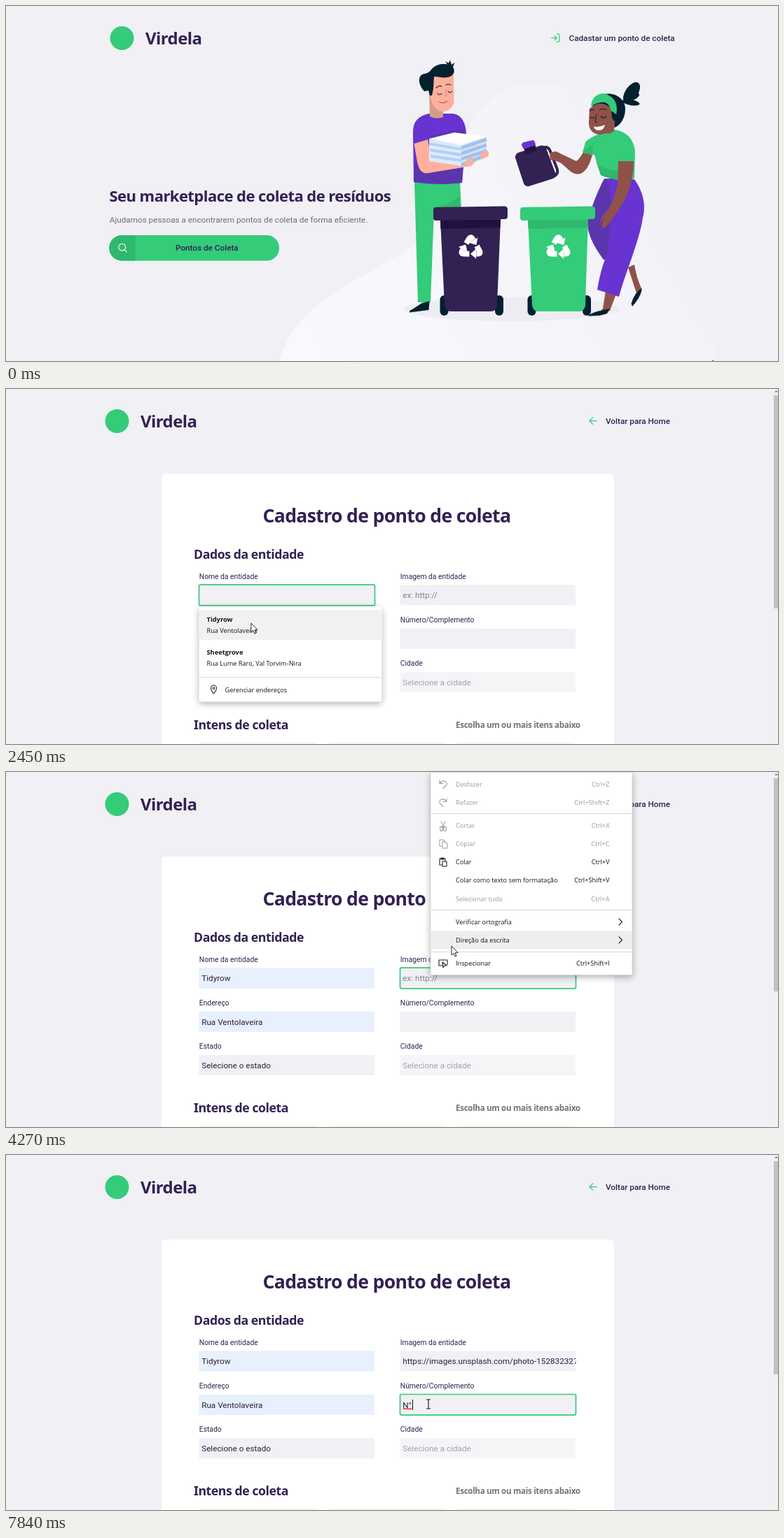
Recreate the animation shown at these times as an HTML page. Size 1102x508 px, loop 8 s.

```html
<!DOCTYPE html>
<html lang="pt-BR">
<head>
<meta charset="utf-8">
<title>Pontos de coleta</title>
<style>
html, body { margin: 0; width: 100%; height: 100%; overflow: hidden; background: #f0f0f5; }
svg { display: block; width: 1102px; height: 508px; cursor: default; }
text { font: 11.73px Roboto, sans-serif; fill: #2a2138; white-space: pre; }
.title { font-family: "Noto Sans", sans-serif; font-weight: 700; letter-spacing: -.025em; fill: #322153; }
.brand { font-size: 24px; }
.h1 { font-size: 26.6px; }
.h2 { font-size: 22px; }
.h3 { font-size: 17.7px; }
.hint { font-size: 11.55px; fill: #75727c; }
.link { font-weight: 500; fill: #322153; }
.label { font-size: 10.3px; fill: #322153; }
.soft { fill: #6c6c80; }
.place { fill: #85838a; }
.off { fill: #a3a1a8; }
.ui { font: 9.2px "Open Sans", sans-serif; fill: #151515; }
.bold { font-weight: 700; font-size: 9.3px; }
.dim { fill: #9a9a9a; }
.line { fill: none; stroke-width: 1.1; stroke-linecap: round; stroke-linejoin: round; }
.shade { filter: drop-shadow(0 3px 5px rgba(0, 0, 0, .3)); }
.skin { fill: #ffb09c; } .brown { fill: #8f524b; } .navy { fill: #03202f; }
.green { fill: #34cb79; } .leaf { fill: #2fb86e; } .violet { fill: #6833d0; }
.plum { fill: #5b35ae; } .dark { fill: #322153; }
</style>
</head>
<body>
<svg viewBox="0 0 1102 508">
  <defs>
    <linearGradient id="haze" x1="0" y1=".7" x2="1" y2=".35">
      <stop offset="0" stop-color="#f8f9fd"/><stop offset=".55" stop-color="#f5f5f9"/><stop offset="1" stop-color="#f0f0f5"/>
    </linearGradient>
    <clipPath id="urlClip"><path d="M563 281H813.500V310H563Z"/></clipPath>
    <g id="third">
      <path d="M-5.800-5.500L-2.200-11.500Q0-15 2.200-11.500L3-10" fill="none" stroke="#fff" stroke-width="7"/>
      <path d="M8.800-13L-2.800-6.600 7-3.500Z" fill="#fff"/>
    </g>
    <g id="cycle">
      <use href="#third"/><use href="#third" transform="rotate(120)"/><use href="#third" transform="rotate(240)"/>
    </g>
  </defs>
  <rect width="1102" height="508" fill="#f0f0f5"/>

  <g id="home">
    <path fill="url(#haze)" d="M391 508C400 470 425 440 470 410C520 377 575 355 605 318C640 270 640 190 680 145C705 117 740 107 775 112C830 119 870 141 905 168C965 214 1015 240 1027 320C1032 380 1025 450 1010 508Z"/>
    <circle cx="165.500" cy="46" r="17" class="green"/>
    <text class="title brand" x="199" y="55">Virdela</text>
    <path class="line" stroke="#34cb79" style="stroke-width:2" transform="translate(777 38.400) scale(.61)" d="M15 3h4a2 2 0 0 1 2 2v14a2 2 0 0 1-2 2h-4M10 17l5-5-5-5M15 12H3"/>
    <text class="link" x="803.500" y="49.700">Cadastar um ponto de coleta</text>
    <text class="title h2" x="147.500" y="279.500">Seu marketplace de coleta de resíduos</text>
    <text class="soft" x="147.800" y="310">Ajudamos pessoas a encontrarem pontos de coleta de forma eficiente.</text>
    <rect x="147.500" y="328" width="242.500" height="36.500" rx="18" class="green"/>
    <path class="leaf" d="M184.500 328V364.500H165.500A18 18 0 0 1 165.500 328Z"/>
    <g class="line" stroke="#fff"><circle cx="165.700" cy="345.200" r="4.900"/><path d="M169.300 348.800L172.300 351.800"/></g>
    <text class="link" x="242" y="350">Pontos de Coleta</text>

    <ellipse cx="722" cy="434" rx="154" ry="17" fill="#ececf2"/>

    <!-- man -->
    <path class="green" d="M583 250H648L650 292H611L606 424H588Z"/>
    <path class="leaf" d="M612 287Q635 285 647 272L648 290H612Z"/>
    <path class="navy" d="M594 425L604.500 422.500 603.500 435 576 438.500Q575 436 580 434Z"/>
    <path class="violet" d="M604 154C590 157 581 164 581 180L582 252Q616 257 651 253L657 186C657 170 652 156 638 154Z"/>
    <path class="plum" d="M583 230L605 185 655 176 651 253Q616 257 582 252Z"/>
    <path class="violet" d="M581 180Q583 165 600 160L610 185 602 191 582 198Z"/>
    <path d="M604 124H624V159Q614 163 605 158Z" fill="#d59b88"/>
    <path class="skin" d="M605 100L639 96L639.500 135C639 147 630 151 622 151C612 149 607 139 605 128Z"/>
    <path class="navy" d="M605 128L603 121 597 122C588 112 587 99 597 97Q604 96 607 91C613 84 621 82 630 83.500L627 79.500 632 81.500 634 77.500 636 84 640.500 81 638 87Q642 94 637 99C628 106 617 100 611 101L610 118 608 128Z"/>
    <g class="line" stroke="#222036"><path d="M616 125q3 4 6 0M631 122q3 4 5.500 0M614 117q4-4 8-2M628 113q4-2 7 0"/><path d="M627 120l2 8-3 .5" stroke="#db8677"/><path d="M618 137q6 4 12-1" stroke="#bc5d58"/></g>
    <path class="skin" d="M582.500 197L602 191 607 219 660 220Q684 209 687 206L689.500 211Q688 218 672 221L664 229 603 239C593 241 589 233 587 223Z"/>
    <path d="M604 190L650 198V229L604 222Z" fill="#dcebfd"/>
    <path d="M650 198L686 187V209L650 228Z" fill="#d4e3f8"/>
    <path d="M604 197L650 205M605 206L650 213M606 215L650 221" fill="none" stroke="#b6cdf5" stroke-width="3.800"/>
    <path d="M650 203L686 191M650 211L686 199M650 219L686 207M650 227L684 214" fill="none" stroke="#a4c1e9" stroke-width="5"/>
    <path d="M603.500 190L640 181 686 187 650 199Z" fill="#fff"/>
    <path class="skin" d="M655 224Q662 214 667 217L664 224Q660 230 655 228ZM676 213L686 206Q691 211 687 216L680 218Z"/>

    <!-- woman -->
    <g class="navy">
      <ellipse cx="893" cy="124" rx="17" ry="9" transform="rotate(-56 893 124)"/>
      <ellipse cx="893" cy="131" rx="12" ry="4.500" transform="rotate(-24 893 131)"/>
      <ellipse cx="892" cy="138" rx="12.500" ry="4" transform="rotate(10 892 138)"/>
      <path d="M845 130C862 119 884 130 884 147C884 162 876 171 869 174L858 155 836 142Z"/>
    </g>
    <path class="brown" d="M888 374L897 370Q900 389 907 404L900 411ZM856 407L871 412 862 436 848 441Q847 437 852 433Z"/>
    <path class="navy" d="M831 443Q837 439 844 437L862 433 858 440Q848 444 831 443.500ZM907.500 403.500Q908 414 894 430L892.500 426Q897 410 907.500 403.500Z"/>
    <path class="plum" d="M854 247H875L865 362 853 363Q828 330 830 306Q843 267 854 247Z"/>
    <path class="violet" d="M857 247L897 248C909 265 914 284 909 303C904 337 884 382 875 416L844 406Q850 370 860 352C857 328 873 290 857 247Z"/>
    <path class="brown" d="M827 203L837 213Q832 233 822 239Q815 243 806 237L787 220 777 219 776 210 785 208 814 222Q821 217 827 203Z"/>
    <path class="green" d="M827 195Q833 187 859 179L869 177Q894 181 898 207L897 247Q874 253 849 242L840 213 823 210Z"/>
    <path class="leaf" d="M841 218Q846 235 878 236V249Q858 247 849 242ZM823 208L838 198 837 214Z"/>
    <path class="brown" d="M855 164H869L868 179Q858 186 853 180Z"/>
    <path class="brown" d="M833 147Q848 132 865 147L867 165Q863 184 846 184Q831 181 832 165Z"/>
    <path class="green" d="M835 144Q836 126 854 125Q876 132 871 156L864 151Q861 136 849 138Q841 139 835 144Z"/>
    <path class="navy" d="M864 150L871 155 868 164 865 160Z"/>
    <path d="M839 172.500Q847 174 855 170Q853 179 845 178Q840 177 839 172.500Z" fill="#fff"/>
    <path class="line" stroke="#261e2b" d="M834 159q3 3 6 0M849 158q4 4 8 0M833 150q3-3 7-1M847 149q5-4 10 0M843 155l-2 11 3 .5"/>
    <path class="brown" d="M874 222H896Q896 244 889 264Q882 283 867 302Q860 314 852 319L850 313 856 300 848 311Q849 300 859 292Q870 273 873 254Z"/>

    <!-- jerrycan -->
    <path d="M773 205L787 238" stroke="#fff" stroke-width="8"/>
    <path d="M733.500 216L765 206 778 241 745 251.500Z" fill="#322153" stroke="#322153" stroke-width="13" stroke-linejoin="round"/>
    <path d="M766 203Q774 200 777 208L787 234Q789 241 780 245" fill="none" stroke="#322153" stroke-width="4"/>
    <path d="M739 203L755 198 758 207 742 212Z" fill="#24143f"/>
    <path class="violet" d="M736 199Q736 196 739 195L752 192Q755 192 756 199L739 205Z"/>
    <path class="brown" d="M776 211Q780 207 789 210L797 217 793 225 786 222 777 220Z"/>

    <!-- bins -->
    <g class="navy">
      <rect x="619.500" y="414" width="12" height="29" rx="6"/><rect x="698" y="414" width="12" height="29" rx="6"/>
      <rect x="744.500" y="414" width="12" height="29" rx="6"/><rect x="823" y="414" width="12" height="29" rx="6"/>
    </g>
    <path class="dark" d="M620 305H706L701 428Q700 437 692 437H636Q627 437 626 428Z"/>
    <path d="M620 306H706L705.500 317 620.500 319Z" fill="#20103d"/>
    <path class="dark" d="M614 288L712 286.500Q716 287 716 291V301Q716 305 712 305L614 307Q610 307 610 303V292Q610 288 614 288Z"/>
    <path class="green" d="M745 305H831L827 428Q826 437 818 437H760Q752 437 751 428Z"/>
    <path class="leaf" d="M745 306H831L830.500 317 745.500 319Z"/>
    <path class="green" d="M738 288L837 286.500Q841 287 841 291V301Q841 305 837 305L738 307Q734 307 734 303V292Q734 288 738 288Z"/>
    <use href="#cycle" transform="translate(663.500 346) scale(1.120)"/>
    <use href="#cycle" transform="translate(788.500 346) scale(1.120)"/>
  </g>

  <g id="form"></g>
  <g id="cursor">
    <path id="arrow" d="M0 0V13L3 10.400 5 15.200 7 14.300 5 9.700H9.200Z" fill="#fff" stroke="#111" stroke-width=".9"/>
    <path id="hand" d="M-1.500 11V1.500Q-1.500 0 0 0T1.500 1.500V6Q4 5 4.500 7Q7 6 7.200 8Q9.500 7.500 9.500 10V13Q9.500 16 8 17.500V19H0V17.500L-4.500 12Q-5.500 10-4 9.500Q-3 9.500-1.500 11ZM1.500 6V10M4.500 7V10M7.200 8V10.500" fill="#fff" stroke="#111" stroke-width=".9" stroke-linejoin="round"/>
    <path id="beam" d="M-3-6.500H-.8Q0-6.500 0-5.700 0-6.500.8-6.500H3M0-5.700V5.700M-3 6.500H-.8Q0 6.500 0 5.700 0 6.500.8 6.500H3" fill="none" stroke="#111" stroke-width="1.100"/>
  </g>
</svg>
<script>
const LOOP = 8000;
const $ = id => document.getElementById(id);
const text = (x, y, s, cls = '') => `<text x="${x}" y="${y}" class="${cls}">${s}</text>`;
const box = (x, y, w, h, fill, more = '') => `<rect x="${x}" y="${y}" width="${w}" height="${h}" fill="${fill}" ${more}/>`;
const group = (id, body, more = '') => `<g id="${id}" ${more}>${body}</g>`;
const COLS = [275.5, 562.5], ROWS = [280.5, 342.8, 405];
const field = (c, r, fill = '#f0f0f5') => box(COLS[c], ROWS[r], 250.5, 29, fill);
const value = (c, r, s, cls) => text(COLS[c] + 3.7, ROWS[r] + 18.9, s, cls);
const focus = (id, c, r) => group(id, box(COLS[c], ROWS[r] - .3, 251, 29.6, 'none', 'stroke="#34cb79" stroke-width="1.7" rx="2"'));
const squiggle = (id, x, y, w) => group(id, `<path class="line" stroke="#e2322d" d="M${x} ${y}${'l1.5 1.500 1.500-1.500'.repeat(Math.round(w / 3))}"/>`);

const entity = 'Tidyrow', street = 'Rua Ventolaveira';
const entity2 = 'Sheetgrove', street2 = 'Rua Lume Raro, Val Torvim-Nira';

function popup(id, x, y, lines) {
  const offsets = [22, 38, 69, 85];
  return group(id, box(x, y, 261, 136.5, '#fff', 'rx="3" class="shade"')
    + (id === 'namePop' ? group('popHover', box(x, y + 5, 261, 43, '#f1f1f1')) : '')
    + lines.map((s, i) => text(x + 11, y + offsets[i], s, i % 2 ? 'ui' : 'ui bold')).join('')
    + `<path d="M${x} ${y + 101.5}h261" stroke="#dcdcdc"/>`
    + `<g class="line" stroke="#222"><path d="M${x + 21} ${y + 125}q-4-5-4-8a4 4 0 0 1 8 0q0 3-4 8Z"/><circle cx="${x + 21}" cy="${y + 117}" r="1.300"/></g>`
    + text(x + 37, y + 122.7, 'Gerenciar endereços', 'ui'));
}

const MENU = [
  [17.5, 'Desfazer', 'Ctrl+Z', 0, 'M0 0v5h5M0 5q4-5 8-3t1 6l-4 4'],
  [43.5, 'Refazer', 'Ctrl+Shift+Z', 0, 'M10 0v5h-5M10 5q-4-5-8-3t-1 6l4 4'],
  [77, 'Cortar', 'Ctrl+X', 0, 'M2 0l5 9M8 0l-5 9M1 10a2 2 0 1 0 3 0a2 2 0 1 0-3 0M6 10a2 2 0 1 0 3 0a2 2 0 1 0-3 0'],
  [103, 'Copiar', 'Ctrl+C', 0, 'M3 9h-3v-9h5l2 2M4 3h4l3 3v6h-7z'],
  [129, 'Colar', 'Ctrl+V', 1, 'M3 10h-3v-9h8v3M2 0h4v2h-4zM4 5h6v7h-6z'],
  [155, 'Colar como texto sem formatação', 'Ctrl+Shift+V', 1],
  [181.5, 'Selecionar tudo', 'Ctrl+A', 0],
  [214.5, 'Verificar ortografia', '', 1],
  [240.5, 'Direção da escrita', '', 1],
  [274, 'Inspecionar', 'Ctrl+Shift+I', 1, 'M4 9h-5v-8h12v7M4 4l6 5h-3l-2 3z']
];

function menu() {
  const rows = MENU.map(([y, name, keys, on, icon]) => {
    const cls = on ? 'ui' : 'ui dim';
    return text(642, y + 3.3, name, cls)
      + `<text x="861.500" y="${y + 3.3}" class="${cls}" text-anchor="end">${keys}</text>`
      + (keys ? '' : `<path class="line" stroke="#222" d="M875 ${y - 4.5}l4.500 4.500-4.500 4.500"/>`)
      + (icon ? `<path class="line" stroke="${on ? '#222' : '#a0a0a0'}" transform="translate(619 ${y - 6})" d="${icon}"/>` : '');
  }).join('');
  return group('menu', box(606, .5, 288, 290, '#fff', 'class="shade" stroke="#cfcfcf" stroke-width=".7"')
    + box(606, 0, 288, 26, '#eee', 'id="menuHover"')
    + '<path d="M606 59.500h288M606 197.500h288M606 257.500h288" stroke="#d8d8d8"/>' + rows);
}

const labels = [['Nome da entidade', 'Imagem da entidade'], ['Endereço', 'Número/Complemento'], ['Estado', 'Cidade']];
$('form').innerHTML =
  '<circle cx="158.500" cy="46" r="17" class="green"/>' + text(192, 55, 'Virdela', 'title brand')
  + '<path class="line" stroke="#34cb79" style="stroke-width:2" transform="translate(830.500 38.200) scale(.61)" d="M21 12H4M12 20L4 12 12 4"/>'
  + text(856, 49.7, 'Voltar para Home', 'link')
  + box(222, 121, 646, 400, '#fff', 'rx="6"')
  + text(366.5, 191.3, 'Cadastro de ponto de coleta', 'title h1')
  + text(268, 243, 'Dados da entidade', 'title h3')
  + labels.map((pair, r) => pair.map((s, c) =>
      text(COLS[c] + .3, ROWS[r] - 8.7, s, 'label') + field(c, r, c && r === 2 ? '#f5f5f8' : undefined)).join('')).join('')
  + value(0, 2, 'Selecione o estado') + value(1, 2, 'Selecione a cidade', 'off')
  + text(268, 486.7, 'Intens de coleta', 'title h3')
  + text(642, 484.5, 'Escolha um ou mais itens abaixo', 'title hint')
  + [275.5, 459, 642.5].map(x => box(x, 505.5, 170.5, 20, '#f5f5f5', 'rx="5"')).join('')
  + box(1096, 0, 6, 508, '#f1f1f1') + box(1096, 9, 6, 305, '#c1c1c1')
  + '<path d="M1097 4.500l2.500-2.500 2.500 2.500z" fill="#777"/>'
  + group('filled', field(0, 0, '#e8f0fe') + field(0, 1, '#e8f0fe') + value(0, 0, entity) + value(0, 1, street))
  + squiggle('nameWave', 279.5, 300.5, 40.5)
  + group('sample', value(1, 0, 'ex: http://', 'place'))
  + group('url', value(1, 0, 'https://images.unsplash.com/photo-1528323273322'), 'clip-path="url(#urlClip)"')
  + focus('nameFocus', 0, 0) + focus('urlFocus', 1, 0) + focus('numFocus', 1, 1)
  + group('n1', value(1, 1, 'N')) + group('n2', value(1, 1, 'N°')) + squiggle('numWave', 567, 362.5, 12)
  + box(0, 350, 1, 15, '#111', 'id="caret"')
  + popup('namePop', 275.5, 311, [entity, street, entity2, street2])
  + popup('numPop', 562.5, 372, [street, entity, street2, entity2])
  + group('tip', box(609.5, 366.5, 107, 20, '#fff', 'stroke="#777"') + text(615.5, 380, 'Preencha este campo.', 'ui soft'))
  + menu();

// [start, end) in ms during which each part is shown
const SHOWN = {
  home: [0, 900], form: [900, LOOP],
  nameFocus: [1910, 3720], namePop: [1910, 2600], popHover: [2250, 2600],
  filled: [2600, LOOP], nameWave: [2600, 3720],
  urlFocus: [3720, 5600], menu: [3800, 4750], sample: [0, 4750], url: [4750, LOOP],
  numFocus: [5600, LOOP], numPop: [5600, 7000], tip: [5830, 6050],
  n1: [7000, 7840], n2: [7840, LOOP], numWave: [7840, LOOP]
};
const CARET = [[5600, 6140, 567], [6680, 7000, 567], [7000, 7530, 575], [7840, LOOP, 580]];
const PATH = [
  [0, 1009, 507], [70, 1009, 507], [580, 828, 49], [900, 828, 49], [1520, 346, 261],
  [1760, 344, 300], [2100, 344, 300], [2450, 350, 335], [2650, 350, 335], [3250, 609, 308],
  [3400, 609, 308], [3570, 609, 291], [3870, 609, 291], [4250, 636, 249], [4290, 636, 249],
  [4490, 666, 127], [4580, 666, 128], [4780, 666, 128], [5500, 603, 355], [6050, 603, 355],
  [6060, 603, 356.5], [LOOP, 603, 356.5]
];

const show = (id, on) => { $(id).style.display = on ? '' : 'none'; };
const during = (t, [a, b]) => t >= a && t < b;

function pointer(t) {
  const i = PATH.findIndex(p => p[0] > t);
  const [t0, x0, y0] = PATH[i - 1], [t1, x1, y1] = PATH[i];
  const u = (t - t0) / (t1 - t0), k = u * u * (3 - 2 * u);
  return [x0 + (x1 - x0) * k, y0 + (y1 - y0) * k];
}

function shape(t, x, y) {
  if (t < 900) return y > 36 && y < 56 && x > 778 && x < 956 ? 'hand' : 'arrow';
  if (during(t, SHOWN.menu)) return 'arrow';
  if (during(t, SHOWN.namePop) && y > 311) return 'arrow';
  const over = COLS.some(c => x > c && x < c + 251) && ROWS.slice(0, 2).some(r => y > r && y < r + 30);
  return over ? 'beam' : 'arrow';
}

function draw() {
  const t = performance.now() % LOOP;
  for (const id in SHOWN) show(id, during(t, SHOWN[id]));
  const blink = CARET.find(c => during(t, c));
  show('caret', blink);
  if (blink) $('caret').setAttribute('x', blink[2]);

  const [x, y] = pointer(t), kind = shape(t, x, y);
  $('cursor').setAttribute('transform', `translate(${x} ${y})`);
  for (const id of ['arrow', 'hand', 'beam']) show(id, id === kind);

  const row = MENU.find(m => m[3] && Math.abs(m[0] - y) < 13);
  show('menuHover', row);
  if (row) $('menuHover').setAttribute('y', row[0] - 13);
  requestAnimationFrame(draw);
}
draw();
</script>
</body>
</html>
```
